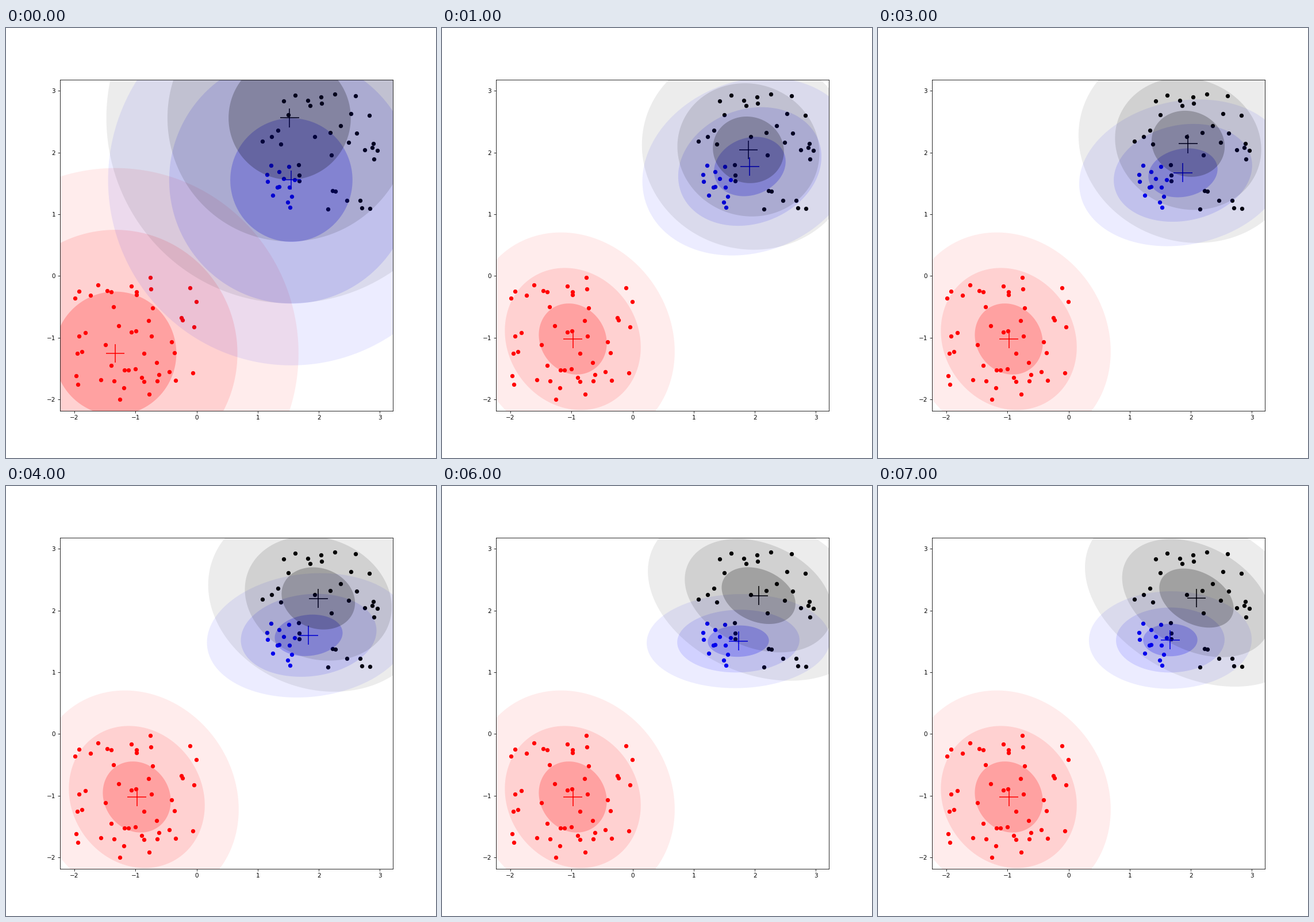
Write a matplotlib script that moves like this. It is 748 px wide and 748 px high and loops after 8 s.

```python
import numpy as np
import matplotlib.pyplot as plt
from matplotlib.animation import FuncAnimation
from matplotlib.patches import Polygon

STEPS = 8
ALPHA = 0.225      # fill strength of the 1-sigma ellipse
SIGMAS = (1, 2, 3)
COLORS = ("red", "blue", "black")

# Gaussian: mean x, mean y, sigma x, sigma y, correlation
STARTS = (
    (-1.332, -1.252, 1, 1, 0),
    (1.551, 1.554, 1, 1, 0),
    (1.523, 2.559, 1, 1, 0),
)
# Key Gaussians at these steps; a cubic runs through them
KEY_STEPS = (1, 3, 5, 7)
RED_KEYS = [(-0.979, -1.019, 0.556, 0.575, -0.117)] * 4
BLUE_KEYS = [
    (1.918, 1.773, 0.586, 0.480, 0.165),
    (1.871, 1.671, 0.566, 0.396, 0.150),
    (1.787, 1.536, 0.535, 0.283, 0.075),
    (1.664, 1.522, 0.444, 0.263, 0.010),
]
BLACK_KEYS = [
    (1.895, 2.043, 0.581, 0.539, -0.050),
    (1.956, 2.141, 0.598, 0.535, -0.085),
    (2.027, 2.234, 0.602, 0.473, -0.215),
    (2.092, 2.201, 0.608, 0.478, -0.345),
]


def fit_path(start, keys):
    """One Gaussian per step: a jump from the start, then a smooth drift."""
    coef = np.polyfit(KEY_STEPS, keys, 3)
    powers = np.vander(np.arange(1, STEPS), 4)
    return np.vstack([start, powers @ coef])


def ellipse(fit, k):
    """Outline of the k-sigma contour."""
    mx, my, sx, sy, r = fit
    t = np.linspace(0, 2 * np.pi, 240, endpoint=False)
    x = mx + k * sx * np.cos(t)
    y = my + k * sy * (r * np.cos(t) + np.sqrt(1 - r * r) * np.sin(t))
    return np.column_stack((x, y))


def make_samples():
    """Uniform clouds; the blue group owns the lower left of the upper one."""
    rng = np.random.default_rng(7)
    red = rng.uniform(-2, 0, (50, 2))
    blue = rng.uniform((1.15, 1), (1.62, 1.85), (14, 2))
    cloud = rng.uniform(1, 3, (80, 2))
    corner = (cloud[:, 0] < 1.66) & (cloud[:, 1] < 1.92)
    return red, blue, cloud[~corner][:36]


fig, ax = plt.subplots(figsize=(10, 10), dpi=74.8)
ax.set_xlim(-2.24, 3.214)
ax.set_ylim(-2.18, 3.18)
ax.set_xticks(range(-2, 4))
ax.set_yticks(range(-2, 4))

for points, color in zip(make_samples(), COLORS):
    ax.scatter(*points.T, c=color)

centers = ax.scatter([0] * 3, [0] * 3, c=COLORS, marker="+", s=1000)

paths = [fit_path(start, keys) for start, keys
         in zip(STARTS, (RED_KEYS, BLUE_KEYS, BLACK_KEYS))]

# Translucent contours lie over the dots and crosses
rings = []
for path, color in zip(paths, COLORS):
    for k in SIGMAS:
        ring = Polygon(ellipse(path[0], k), facecolor=color,
                       edgecolor="none", alpha=ALPHA / k)
        ax.add_patch(ring)
        rings.append((ring, path, k))


def draw(step):
    centers.set_offsets([path[step, :2] for path in paths])
    for ring, path, k in rings:
        ring.set_xy(ellipse(path[step], k))
    return [centers] + [ring for ring, _, _ in rings]


anim = FuncAnimation(fig, draw, frames=STEPS, interval=1000, repeat=True)
plt.show()
```
